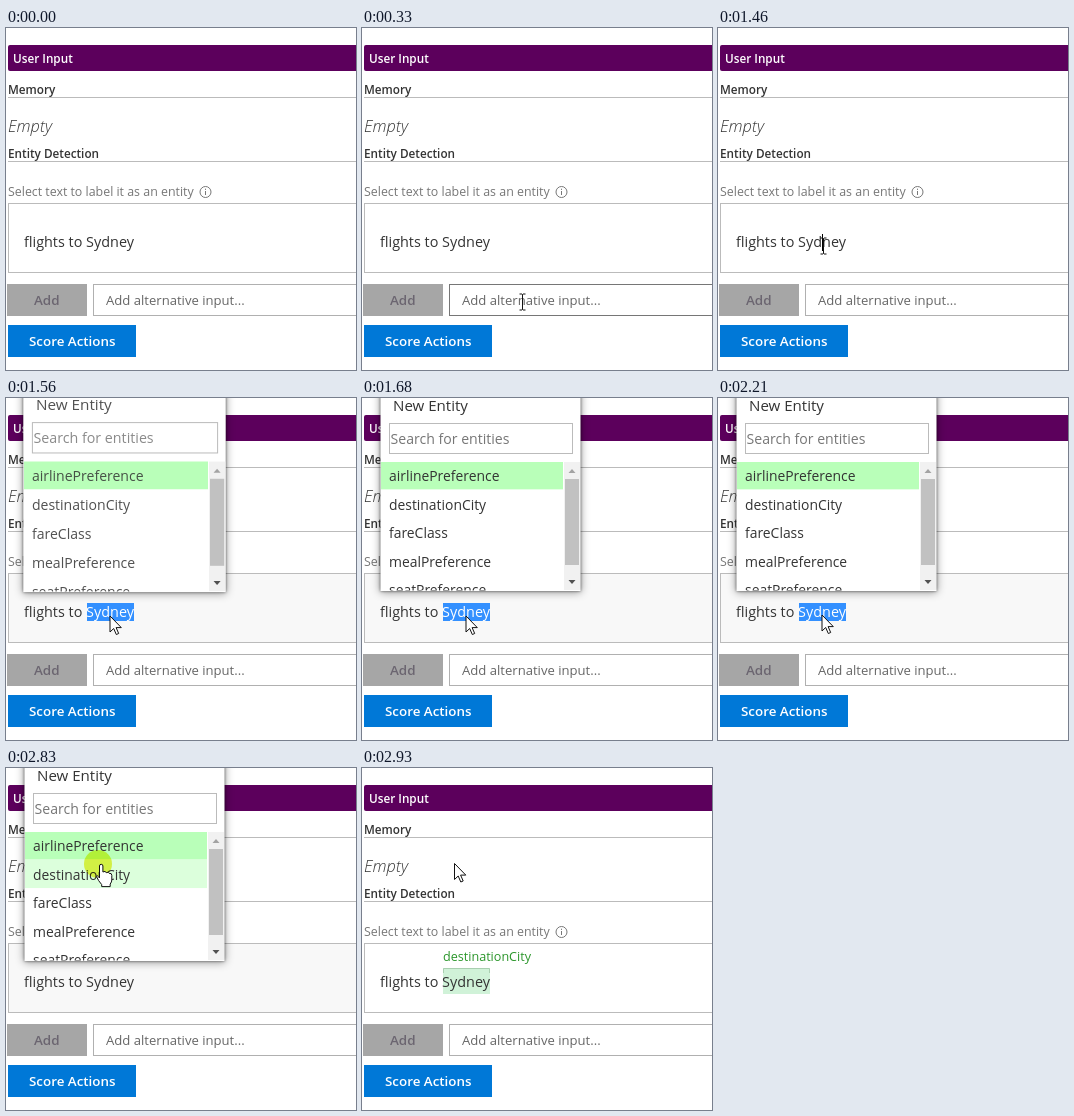
Write an HTML page that moves like this. It is 350x342 px and loops after 3.22 s.

```html
<!DOCTYPE html>
<html lang="en">
<head>
<meta charset="utf-8">
<title>Entity labelling</title>
<style>
html, body { margin: 0; width: 100%; height: 100%; overflow: hidden; background: #fff; }
#stage { display: block; width: 100%; height: 100%; }
text { font-family: "Open Sans", "Noto Sans", sans-serif; fill: #333; white-space: pre; }
.bold { font-weight: 600; font-size: 11.75px; }
.button { font-weight: 600; font-size: 13.4px; }
.white { fill: #fff; }
.line { fill: none; stroke: #bbb; }
.row { font-size: 13.9px; }
#popup { transform-origin: 118.5px 100px; }
#frame { filter: drop-shadow(0 0 1.5px #0009) drop-shadow(0 1px 4px #0006); }
#click { mix-blend-mode: multiply; }
.cursor { fill: #fff; stroke: #111; stroke-linejoin: round; }
</style>
</head>
<body>
<svg id="stage" viewBox="0 0 350 342">
  <path d="M352 17H4a2 2 0 0 0-2 2v22a2 2 0 0 0 2 2h348z" fill="#5c005c"/>
  <text x="7" y="35" class="bold white">User Input</text>
  <text x="2" y="66" class="bold">Memory</text>
  <path class="line" d="M2 69.5H350M2 133.5H350"/>
  <text x="2" y="104" font-size="16.4" font-weight="300" font-style="italic">Empty</text>
  <text x="2" y="130" class="bold">Entity Detection</text>
  <text x="2" y="168" font-size="12.4" style="fill:#767676">Select text to label it as an entity</text>
  <g fill="none" stroke="#777">
    <circle cx="199.5" cy="164" r="5.5"/>
    <path d="M199.5 163v4M199.5 160.7v1.2"/>
  </g>

  <rect id="panel" class="line" x="2.5" y="175.5" width="360" height="69"/>
  <rect id="selection" x="81" y="205" width="47" height="18" fill="#3390ff"/>
  <g id="label">
    <rect x="81" y="200" width="47" height="26" fill="#d0f2d8"/>
    <path d="M81.5 205v-4.5h46v4.5" fill="none" stroke="#a9cfb0"/>
    <text x="81" y="193" font-size="12.6" style="fill:#2b962b">destinationCity</text>
  </g>
  <text x="18" y="219" font-size="14.4">flights to <tspan id="word">Sydney</tspan></text>
  <path id="caret" d="M104.5 206v17" stroke="#000"/>

  <rect x="1" y="256" width="80" height="32" fill="#a6a6a6"/>
  <text x="28" y="277" class="button" style="fill:#6b6570">Add</text>
  <rect id="field" class="line" x="87.5" y="256.5" width="280" height="31"/>
  <text x="100" y="277" font-size="13.1" style="fill:#666">Add alternative input...</text>
  <rect x="2" y="297" width="128" height="32" fill="#0078d7"/>
  <text x="23" y="318" class="button white">Score Actions</text>

  <g id="popup">
    <rect id="frame" x="18.5" y="-30" width="200" height="223" fill="#fff"/>
    <text x="31" y="13" font-size="15.1">New Entity</text>
    <rect class="line" x="27.5" y="25.5" width="183" height="30"/>
    <text x="28.5" y="46" font-size="14.1" style="fill:#767676">Search for entities</text>
    <svg id="list" x="19" y="64" width="183" height="128.5"></svg>
    <rect x="202" y="64" width="16" height="128" fill="#f1f1f1"/>
    <rect x="203" y="81" width="14" height="86" fill="#c1c1c1"/>
    <path d="M206.500 75l3.500-4 3.500 4z" fill="#a3a3a3"/>
    <path d="M206.500 182l3.500 4 3.500-4z" fill="#505050"/>
  </g>

  <circle id="click" cx="92" cy="96" r="14" fill="#f4f04e"/>
  <g id="pointer">
    <path id="arrow" class="cursor" d="M0 0v16l3.700-3.500 2.600 6 2.400-1-2.600-5.900h5.200z"/>
    <path id="beam" fill="none" stroke="#111" d="M-3 -8h2.500l.5.500.5-.5h2.500M0-7.500v15M-3 8h2.500l.5-.5.5.5h2.500"/>
    <path id="hand" class="cursor" d="M-1.500 13V1a1.700 1.700 0 0 1 3.400 0v6q2.500-1.500 3.300.6 2.300-1 3 .8 2.600-.6 2.600 2v4.500q0 2-1.600 4.200v2.500h-8.500v-2q-3.500-4-5.200-8 0-2.500 3 1.400z"/>
  </g>
</svg>
<script>
const LOOP = 3220;
const ROW = 28.6;
const $ = id => document.getElementById(id);
const show = (id, on) => $(id).style.display = on ? "" : "none";

$("list").innerHTML = ["airline", "destination", "fare", "meal", "seat"].map((name, i) => {
  const suffix = ["Preference", "City", "Class"][i] || "Preference";
  return `<rect y="${i * ROW - 1}" width="182" height="${ROW}"/>
    <text class="row" x="8" y="${19 + i * ROW}">${name + suffix}</text>`;
}).join("");
const rows = $("list").querySelectorAll("rect");

const steps = [
  [0, "", 0, 0],
  [210, "arrow", 195, 310], [330, "beam", 160.5, 274],
  [490, "beam", 134.500, 246], [600, "beam", 119.500, 233], [720, "beam", 112.500, 226],
  [840, "beam", 108.500, 221], [960, "beam", 106.500, 219], [1080, "beam", 105.500, 218],
  [1560, "arrow", 104, 218], [2210, "arrow", 104, 217],
  [2330, "hand", 102, 172], [2450, "hand", 98, 122], [2580, "hand", 95, 97],
  [2930, "arrow", 92.500, 95.500]
];

function draw(now) {
  const t = now % LOOP;
  const within = (from, to) => t >= from && t < to;
  const open = within(1560, 2930);
  const opening = within(1560, 1680);
  const selected = within(1560, 2730);
  const [, shape, x, y] = steps.findLast(s => s[0] <= t);

  for (const id of ["arrow", "beam", "hand"]) show(id, id === shape);
  $("pointer").setAttribute("transform", `translate(${x} ${y})`);

  const hovered = shape === "hand" ? Math.floor((y - 63) / ROW) : -1;
  rows.forEach((row, i) =>
    row.setAttribute("fill", i === 0 ? "#b9ffb9" : i === hovered ? "#dcffdc" : "#fff"));

  show("popup", open);
  $("popup").style.transform = opening ? "scale(1.012)" : "none";
  for (const text of $("popup").querySelectorAll("text")) text.style.opacity = opening ? .85 : 1;
  $("panel").style.fill = open ? "#f8f8f8" : "#fff";
  $("field").style.stroke = within(330, 490) ? "#767676" : "#b0b0b0";
  show("selection", selected);
  $("word").style.fill = selected ? "#fff" : "#333";
  show("caret", within(1460, 1560));
  show("click", within(2730, 2930));
  show("label", t >= 2930);
}

const start = performance.now();
function tick() {
  draw(performance.now() - start);
  requestAnimationFrame(tick);
}
tick();
</script>
</body>
</html>
```
